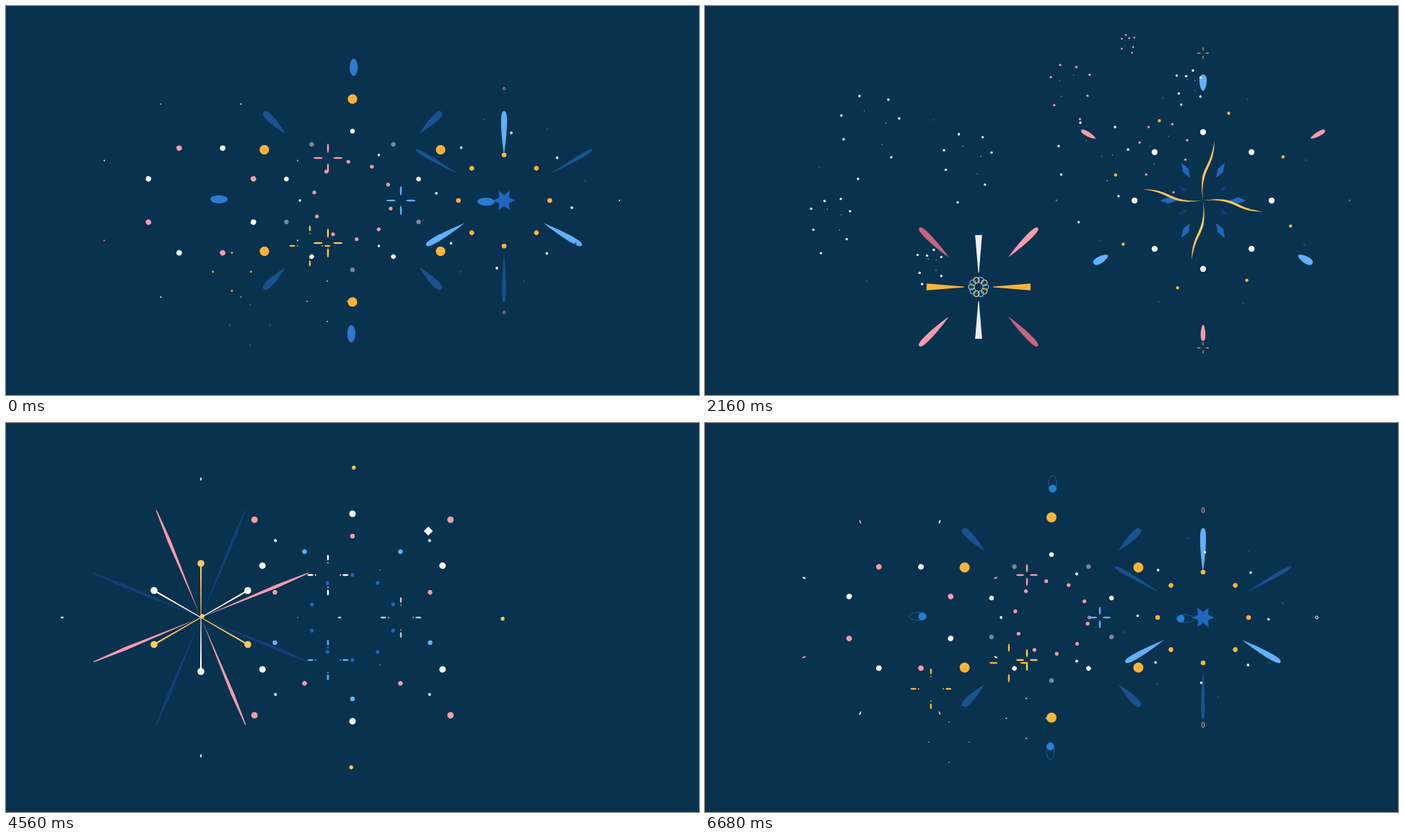
An HTML page with a canvas that plays this animation: 960 px wide and 540 px high, repeating every 6.72 s.

```html
<!DOCTYPE html>
<html lang="en">
<head>
<meta charset="utf-8">
<title>Fireworks</title>
<style>
html, body { margin: 0; width: 100%; height: 100%; overflow: hidden; background: #09324e; }
canvas { display: block; }
</style>
</head>
<body>
<canvas id="stage" width="960" height="540"></canvas>
<script>
const ctx = document.getElementById('stage').getContext('2d');
const PERIOD = 3360, BG = '#09324e';
const WHITE = '#fff', GRAY = '#758997', YELLOW = '#fdb338', GOLD = '#fdc75b', PINK = '#f49bac',
  ROSE = '#c9657b', SKY = '#62b0f8', BLUE = '#2b7bcf', ROYAL = '#2166bd', NAVY = '#1a5290', DEEP = '#143f79';
let now = 0;

const clamp = v => Math.max(0, Math.min(1, v));
const ramp = (t, a, b) => clamp((t - a) / (b - a));
const out = (t, a, b, p = 3) => 1 - (1 - ramp(t, a, b)) ** p;
const fade = (t, a, b) => 1 - ramp(t, a, b);
const rad = d => d * Math.PI / 180;
// Time relative to a moment of the loop, from -1000 upwards
const since = t0 => ((now - t0 + 1000) % PERIOD + PERIOD) % PERIOD - 1000;

function at(x, y, scale, draw) {
  ctx.save();
  ctx.translate(x, y);
  ctx.scale(scale, scale);
  draw();
  ctx.restore();
}

// Runs draw(k) n times around the centre, with "up" pointing outwards
function around(n, rot, draw) {
  for (let k = 0; k < n; k++) {
    ctx.save();
    ctx.rotate(rad(rot + 360 / n * k));
    draw(k);
    ctx.restore();
  }
}

function oval(x, y, rx, ry, color, line) {
  if (rx <= 0 || ry <= 0) return;
  ctx.beginPath();
  ctx.ellipse(x, y, rx, ry, 0, 0, 7);
  if (line) {
    ctx.strokeStyle = color;
    ctx.lineWidth = line;
    ctx.stroke();
  } else {
    ctx.fillStyle = color;
    ctx.fill();
  }
}

const dot = (x, y, r, color) => oval(x, y, r, r, color);

function ring(n, r, size, colors, rot = 0) {
  around(n, rot, k => dot(0, -r, size, colors[k % colors.length]));
}

function poly(color, ...pts) {
  ctx.fillStyle = color;
  ctx.beginPath();
  for (let i = 0; i < pts.length; i += 2) ctx.lineTo(pts[i], pts[i + 1]);
  ctx.fill();
}

const diamond = (y, w, h, color) => poly(color, 0, y - h, w, y, 0, y + h, -w, y);

// Drop with its tip at r1, its round end at r2 and half-width w; fat .67 makes an ellipse
function petal(r1, r2, w, fat, color) {
  const len = r2 - r1, k = w / (.45 + .3 * fat);
  if (len <= 0 || w <= 0) return;
  ctx.fillStyle = color;
  ctx.beginPath();
  ctx.moveTo(0, -r1);
  ctx.bezierCurveTo(k * fat, -r1 - len * .1, k * 1.05, -r2 - len * .03, 0, -r2);
  ctx.bezierCurveTo(-k * 1.05, -r2 - len * .03, -k * fat, -r1 - len * .1, 0, -r1);
  ctx.fill();
}

function sparkle(x, y, age, color) {
  if (age < 0 || age > 520) return;
  const head = 28.5 * out(age, 0, 260, 2), tail = 28 * Math.min(1, age / 300) ** 1.5;
  at(x, y, 1, () => around(4, 0, () => {
    if (age < 275) {
      oval(0, -(head + tail) / 2, 1.3, (head - tail) / 2, color);
      if (age > 210) dot(0, 3 - tail, .9, color);
    } else dot(0, -Math.min(28, tail + 1), 1.5 * fade(age, 270, 520), color);
  }));
}

function plus(y, color) {
  at(0, y, 1, () => around(4, 0, () => {
    ctx.fillStyle = color;
    ctx.fillRect(-.4, -6.3, .8, 3.4);
  }));
}

// Centre burst: nested dot rings, long drops and sparkles
function roundBurst(t, c) {
  if (t < -500 || t > 700) return;
  at(480, 270, 1, () => {
    const end = fade(t, 150, 520);
    ring(6, 145 * out(t, -500, 480, 5), (t < 0 ? 7 : 6.6 - 2.1 * ramp(t, 0, 120)) * out(t, -500, -300) * end, [c.main]);
    if (t > -256) ring(10, 120 * out(t, -256, 360), 3.2 * end, c.pair);
    if (t > -300) ring(10, 60 * out(t, -300, 260), 2.6 * end, [c.inner], -15 * (1 - ramp(t, -170, 120)));
    if (t > -260) ring(3, 76 * out(t, -300, 160), 2 - 1.2 * ramp(t, -40, 120) - .8 * ramp(t, 120, 260), [c.tiny], 30);

    around(4, 45, () => {
      if (t < 40) petal(131 * out(t, -330, -60), 174 * out(t, -480, -80), 4.8, .1, c.drop);
      else {
        dot(0, -174 - 18 * out(t, 20, 130), 4.5 * fade(t, 160, 480), c.drop);
        dot(0, -c.corner, c.cornerSize * fade(t, 140, 420), WHITE);
      }
    });

    around(4, .5, () => {
      if (t < -20) {
        const r = 185 * out(t, -420, -60);
        if (t < -380) return;
        oval(0, -r, 5.5, 12, c.tip, .6);
        dot(0, 6 - r, 5.4, c.tip);
      } else if (t < 60) oval(0, -185, 5.6, 12, c.tip);
      else {
        const size = 2.7 * fade(t, 250, 560);
        oval(0, -208 - 3 * ramp(t, 120, 400), size, size, c.tip, c.solid ? 0 : .8);
      }
    });
  });
  [[446, 211], [547, 270], [446, 329]].forEach(([x, y], i) => sparkle(x, y, t + 120, c.sparks[i]));
}

// Right burst: star, drops, then diamonds and turning dots
function starBurst(t, c) {
  if (t < -500 || t > 760) return;
  at(690, 270, c.scale, () => {
    const end = fade(t, 200, 720), turn = (1 - ramp(t, -400, 312)) ** 2, r3 = out(t, -400, 312);

    if (c.bars && t > 30 && t < 300) {
      ctx.globalAlpha = fade(t, 120, 300);
      around(4, 0, () => poly('#07304a', -1, -35, -5, -86, 5, -86, 1, -35));
      ctx.globalAlpha = 1;
    }
    if (t < 60) {
      const s = out(t, -480, -250);
      around(6, 30, () => poly(ROYAL, -4.3 * s, -6 * s, 0, -15.5 * s, 4.3 * s, -6 * s, 0, 2));
    } else {
      const s = out(t, 50, 120) * fade(t, 260, 520);
      around(6, 30, () => diamond(-38.5, 3.6 * s, 9.5 * s, ROYAL));
      around(6, 0, () => diamond(-26, 2.4 * s, 5.5 * s, DEEP));
    }

    around(6, 0, k => {
      const bright = k % 2 === 0, push = out(t, 0, 150), shrink = 9 * ramp(t, 140, 480);
      const head = (bright ? 124 : 141) * out(t, -450, -110) + (bright ? 16 : 15) * push;
      const tail = (bright ? 62 : 71) * out(t, -330, -70) + (bright ? 60 : 67) * push;
      const w = (bright ? 4 : 2.6) * fade(t, 240, 480);
      petal(tail + shrink, head - shrink, w, .1 + .57 * push, bright ? SKY : c.drop);
    });

    const yr = 63 * out(t, -420, -90) + 13 * out(t, 0, 140);
    around(8, 0, k => {
      if (!c.bars || k % 2 || t < 60) dot(0, -yr, 3.3 * end * out(t, -420, -300), c.main);
    });
    if (t > -400) {
      ring(8, 103 * r3, 1.8 * end, [c.orbit], 22.5 - 86 * turn);
      ring(8, 125 * out(t, -470, 340), 1.5 * end, [c.faint], 64 * turn - 26);
    }

    around(4, c.rot, k => {
      if (t < -250) return;
      if (k % 2) {
        const r = 165 * out(t, -500, 500, 5) + 4 * ramp(t, 200, 600);
        if (t < -20) oval(0, -r, 1.9, 1.9, WHITE, .9);
        else if (t < 50) dot(0, -r, 1.1, WHITE);
        else if (t < 420) plus(-r, c.cross);
      } else {
        const r = 163 * out(t, -260, 310, 5);
        if (t < -20) oval(0, -r, 1.8, 3.8, c.far, 1);
        else if (t < 60) oval(0, -r, 1.7, 1.7, c.far, 1);
        else dot(0, -r, 1.2 * end, c.far);
      }
    });
  });
}

// Left ring of alternating dots
function dotBurst(t) {
  if (t < -400 || t > 420) return;
  at(270, 270, 1, () => {
    const r = 83 * out(t, -400, 240), size = (3.8 - .5 * ramp(t, 0, 120)) * fade(t, 180, 420);
    around(8, 22.5, k => {
      const color = k % 2 ? PINK : WHITE;
      if (t < 100 || (k !== 1 && k !== 7)) dot(0, -r, size, color);
      const far = 146 * out(t, -400, 240, 5);
      if (t < -20) oval(0, -far, 1, 2.6, color);
      else dot(0, -far, 1 - .5 * ramp(t, 0, 120) - .5 * ramp(t, 120, 220), color);
    });
  });
}

// Left burst of long rays and pins
function rayBurst() {
  const t = now;
  if (t < 760 || t > 2240) return;
  at(270, 270, 1, () => {
    const head = 161 * out(t, 780, 1180), tail = 5 + 156 * ramp(t, 1240, 1600) ** 2;
    if (head > tail) around(8, 22.5, k => {
      const mid = tail + (head - tail) * .7;
      poly(k % 2 ? PINK : DEEP, 0, -tail, 2.3, -mid, .6, -head, -.8, -head, -2.3, -mid);
    });
    const r = 75 * out(t, 800, 1150), root = 75 * ramp(t, 1280, 1560) ** 2, size = 4.8 * fade(t, 1450, 1800);
    around(6, 0, k => {
      const color = k % 2 ? WHITE : GOLD;
      if (r > root) poly(color, -.5, -root, -1.1, -r, 1.1, -r, .5, -root);
      dot(0, -r - 25 * out(t, 1300, 1800), size, color);
    });
    dot(2, -2, 2.8 * fade(t, 1250, 1400), GOLD);
    around(4, 0, () => oval(0, -192 * out(t, 780, 1200) - 35 * out(t, 1200, 1900), 1.2, 2.3 * fade(t, 1500, 2000), '#d5d6d8'));
    if (t > 1560) ring(4, 161 - 40 * out(t, 1560, 2100), 1.2, [NAVY], 22.5);
  });
}

// Blades that spin up in the centre
function propeller() {
  const t = now;
  if (t < 20 || t > 560) return;
  at(480, 270, 1, () => {
    const grow = out(t, 20, 120) * fade(t, 340, 560);
    ctx.rotate(rad(90 * out(t, 120, 440)));
    around(2, 0, () => {
      ctx.scale(grow, grow);
      ctx.fillStyle = '#f0e9ed';
      ctx.beginPath();
      ctx.moveTo(-2, 0);
      ctx.bezierCurveTo(5, -22, 6, -32, 4.8, -46);
      ctx.bezierCurveTo(5, -53.5, 14.5, -53.5, 15, -46);
      ctx.bezierCurveTo(16, -30, 11, -18, 0, 0);
      ctx.fill();
    });
    around(2, 107, () => petal(1, (25 + 27 * out(t, 120, 260)) * grow, 4.7, .45, WHITE));
    around(6, 0, () => poly(ROYAL, 0, 0, -3.6 * grow, -6.4 * grow, 3.6 * grow, -6.4 * grow));
  });
}

// Curved pinwheel on the right
function pinwheel() {
  const t = now;
  if (t < 1960 || t > 2500) return;
  at(690, 270, out(t, 1960, 2140) * fade(t, 2280, 2500), () =>
    around(4, 80 * (out(t, 1960, 2160) - 1) + 70 * ramp(t, 2180, 2500), () => {
      ctx.fillStyle = GOLD;
      ctx.beginPath();
      ctx.moveTo(0, 0);
      ctx.bezierCurveTo(-7, -50, 10, -40, 15.5, -83);
      ctx.bezierCurveTo(16.5, -44, -4, -46, 0, 0);
      ctx.fill();
    }));
}

// Lower burst: wedges, drops and a chain of small rings
function wedgeBurst() {
  const t = now;
  if (t < 1860 || t > 2680) return;
  at(379, 390, 1, () => {
    const grow = out(t, 1860, 2140), leave = ramp(t, 2180, 2560), s = grow * fade(t, 2320, 2600);
    around(4, 0, k => {
      const a = 20 * grow + 92 * leave, b = 72 * grow + 43 * leave, w = 4.8 * s;
      if (b > a) poly(k % 2 ? YELLOW : '#f0eff0', -.5, -a, -w, -b, w, -b, .5, -a);
    });
    around(4, 45, k => petal(59 * grow + 62 * leave, 116 * grow + 8 * leave, 4 * s, .22, k % 2 ? ROSE : PINK));
    around(10, 18, k => oval(0, -9.8 * s, 4 * s, 4 * s, k % 2 ? GOLD : SKY, 1.2));
  });
}

// Falling dot clouds: one shape that opens from YOUNG to OLD, some mirrored
const YOUNG = [-40, -28, -8, -25, 14, -45, 40, -21, -33, 33, 40, 43, -25, 70];
const OLD = [-40, -18, -15, -45, 25, -40, 40, -14, -37, 15, 29, 40, -17, 70];
function cloud(x, y, born, flip, color) {
  const t = now - born;
  if (t < 0 || t > 1050) return;
  const s = 1.25 * out(t, 0, 1000), size = 1.7 * out(t, 0, 160) * fade(t, 720, 1050);
  const open = ramp(t, 120, 290);
  const place = i => (YOUNG[i] + (OLD[i] - YOUNG[i]) * open) * s;
  at(x, y, 1, () => {
    for (let i = 0; i < 14; i += 2) {
      const px = place(i) * (flip ? -1 : 1), py = place(i + 1);
      dot(px, py, size, color);
      if (i % 4 === 2) dot(px * .55, py * .55, size * .35, color);
    }
  });
}

function frame() {
  now = performance.now() % PERIOD;
  ctx.fillStyle = BG;
  ctx.fillRect(0, 0, 960, 540);

  rayBurst();
  dotBurst(since(0));
  starBurst(since(0), { scale: 1, bars: true, rot: 0, main: YELLOW, orbit: WHITE, faint: '#17497e', drop: NAVY, cross: '#b9c3ca', far: PINK });
  starBurst(since(2040), { scale: 1.25, rot: 90, main: WHITE, orbit: YELLOW, faint: '#164573', drop: PINK, cross: GOLD, far: BLUE });
  roundBurst(since(0), { main: YELLOW, pair: [WHITE, GRAY], inner: PINK, tiny: WHITE, drop: NAVY, corner: 160, cornerSize: 1.2, tip: BLUE, sparks: [PINK, SKY, GOLD] });
  roundBurst(since(1080), { main: WHITE, pair: [PINK, SKY], inner: ROYAL, tiny: PINK, drop: PINK, corner: 151, cornerSize: 2, tip: GOLD, solid: true, sparks: [WHITE, '#c3c6c9', SKY] });
  propeller();
  wedgeBurst();
  pinwheel();

  sparkle(421, 333, since(-240), YELLOW);
  sparkle(313, 369, since(-280), YELLOW);
  sparkle(445, 410, since(-330), SKY);
  sparkle(338, 443, since(-410), SKY);

  cloud(538, 216, 1500, false, WHITE);
  cloud(229, 170, 1745, false, WHITE);
  cloud(364, 215, 1860, false, WHITE);
  cloud(635, 201, 1860, true, PINK);
  cloud(174, 296, 1934, false, WHITE);
  cloud(506, 110, 1934, true, PINK);
  cloud(311, 357, 2036, false, WHITE);
  cloud(670, 108, 2036, false, WHITE);
  cloud(586, 50, 2100, true, PINK);

  if (now > 1140 && now < 1340) {
    const s = 6.3 * out(now, 1140, 1200) * fade(now, 1240, 1340);
    at(585, 150, 1, () => diamond(0, s, s, WHITE));
  }
  requestAnimationFrame(frame);
}
frame();
</script>
</body>
</html>
```
